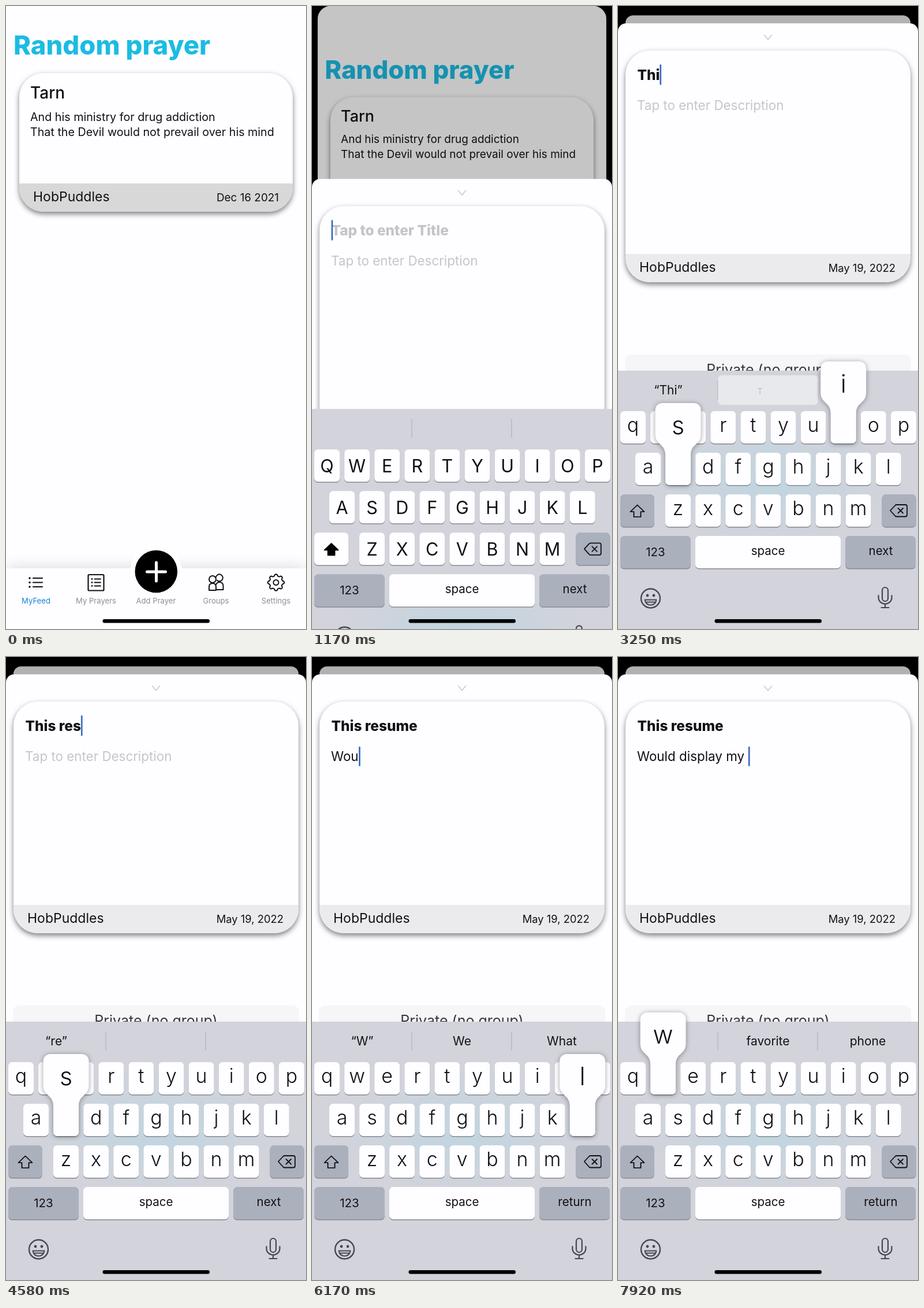
These frames come from a looping animation (520x1078 px, 8000 ms). An HTML page with a canvas:

```html
<!DOCTYPE html>
<html lang="en">
<head>
<meta charset="utf-8">
<title>Adding a prayer</title>
<style>
  html, body { margin: 0; width: 100%; height: 100%; overflow: hidden; background: #000; }
  canvas { display: block; width: 520px; height: 1078px; }
</style>
</head>
<body>
<canvas id="stage" width="520" height="1078"></canvas>
<script>
const ctx = document.getElementById('stage').getContext('2d');
const W = 520, H = 1078, LOOP = 8000, STEP = 1000 / 12;
const PAPER = '#fefdff', INK = '#111114', KEY_GRAY = '#abb0bd';
const USER = 'HobPuddles';

// Timeline (ms)
const OPEN = 1012, FOCUS_BODY = 5480, NEXT_TAP = 5390;
const TYPE_DELAY = 90, POPUP_TIME = 190, SPACE_TIME = 100;
const strokes = (text, times) => [...text].map((char, i) => ({ char, at: times[i] }));
const titleKeys = strokes('This resume',
  [2240, 2720, 3090, 3210, 3560, 3900, 4200, 4470, 4720, 4960, 5180]);
const bodyKeys = strokes('Would display my w',
  [5690, 5830, 5950, 6130, 6290, 6440, 6560, 6660, 6760, 6850, 6940, 7050, 7270, 7400, 7510, 7630, 7760, 7915]);
const allKeys = [...titleKeys, ...bodyKeys];
const suggestions = [
  [0], [2400, '“T”', 'The', 'This'], [2850, '“Th”', 'The', 'This'], [3200, '“Thi”'],
  [3400, '“This”'], [3650, 'is', 'one', 'morning'], [4010, '“r”', 'is', 'right'],
  [4320, '“re”'], [4810, '“resu”', 'result', 'results'], [5270, '“resume”', 'resumes', 'resumed'],
  [5490, 'I', 'The', 'I’m'], [5800, '“W”', 'We', 'What'], [6250, '“Would”', 'Would', 'Wouldn’t'],
  [6530, 'you', 'be', 'like'], [6750, '“dis”', 'did', 'discuss'], [6950, '“disp”', 'display', 'displayed'],
  [7480, 'the', 'a', 'my'], [7600, '“m”', 'my', 'me'], [7850, 'life', 'favorite', 'phone'],
];

const typed = (keys, t) => keys.filter(k => t >= k.at + TYPE_DELAY).map(k => k.char).join('');
const spring = (t, speed) => {
  const u = Math.max(0, t - OPEN) / 1000 * speed;
  return 1 - (1 + u) * Math.exp(-u);
};

// Drawing helpers
function text(str, x, y, size, { color = INK, weight = 400, align = 'left' } = {}) {
  ctx.font = `${weight} ${size}px Inter, sans-serif`;
  ctx.fillStyle = color;
  ctx.textAlign = align;
  ctx.fillText(str, x, y);
}
function box(x, y, w, h, radius, color) {
  ctx.beginPath();
  ctx.roundRect(x, y, w, h, radius);
  ctx.fillStyle = color;
  ctx.fill();
}
function shadowed(color, blur, dy, draw) {
  ctx.save();
  ctx.shadowColor = color;
  ctx.shadowBlur = blur;
  ctx.shadowOffsetY = dy;
  draw();
  ctx.restore();
}
function stroke(path, color = INK, width = 2) {
  ctx.strokeStyle = color;
  ctx.lineWidth = width;
  ctx.lineCap = ctx.lineJoin = 'round';
  ctx.stroke(new Path2D(path));
}
function disc(x, y, r, color) {
  ctx.beginPath();
  ctx.arc(x, y, r, 0, 7);
  ctx.fillStyle = color;
  ctx.fill();
}
function card(x, y, w, h, footerColor) {
  shadowed('rgba(0,0,0,.5)', 10, 4, () => box(x, y, w, h, 42, PAPER));
  ctx.save();
  ctx.beginPath();
  ctx.roundRect(x, y, w, h, 42);
  ctx.clip();
  ctx.fillStyle = footerColor;
  ctx.fillRect(x, y + h - 49, w, 49);
  ctx.restore();
  text(USER, x + 24, y + h - 18, 23);
}

function drawTabBar() {
  shadowed('rgba(0,0,0,.12)', 22, -4, () => box(0, 973, W, 110, 0, PAPER));
  disc(260, 978.5, 45, PAPER);
  disc(260.3, 978.5, 36.8, '#000');
  stroke('M244.500 979H276.500M260.500 963V995', '#fff', 5);

  for (const y of [990, 997.5, 1005]) {
    disc(41, y, 1.8, INK);
    stroke(`M47 ${y}H63`, INK, 2.2);
  }
  stroke('M144 984H168Q169.500 984 169.500 985.500V1010Q169.500 1011.500 168 1011.500H144Q142.500 1011.500 142.500 1010V985.500Q142.500 984 144 984Z', INK, 2.2);
  for (const y of [991.5, 997.5, 1003.5]) {
    disc(149, y, 1.4, INK);
    stroke(`M153.500 ${y}H164`, INK, 2);
  }
  stroke('M352 1011V1005Q352 999 358 999Q364 999 364 1005V1011ZM364 1010H376.500V1003Q376 997 370 997Q366 997 364 1001');
  stroke('M352 992a6 6 0 1 0 12 0a6 6 0 1 0 -12 0M364 988a6 6 0 1 1 2 6');

  let gear = '';
  for (let i = 0; i <= 96; i++) {
    const a = i / 96 * 2 * Math.PI, r = 12.7 + 1.5 * Math.tanh(2 * Math.cos(8 * a));
    gear += `${i ? 'L' : 'M'}${468 + r * Math.cos(a)} ${997.5 + r * Math.sin(a)}`;
  }
  stroke(gear);
  stroke('M463.500 997.500a4.500 4.500 0 1 0 9 0a4.500 4.500 0 1 0 -9 0');

  ['MyFeed', 'My Prayers', 'Add Prayer', 'Groups', 'Settings'].forEach((label, i) =>
    text(label, 52 + i * 104, 1034, 13.1, { color: i ? '#8e8e93' : '#1584d8', align: 'center' }));
}

function drawFeed(p) {
  const scale = 1 - .05 * p;
  ctx.save();
  // The screen's own centre lies above the stage centre.
  ctx.translate(260, 515 + 36 * p);
  ctx.scale(scale, scale);
  ctx.translate(-260, -515);
  ctx.beginPath();
  ctx.roundRect(0, -48, W, 1126, p > 0 ? 54 - 40 * p : 0);
  ctx.clip();
  ctx.fillStyle = PAPER;
  ctx.fillRect(0, -48, W, 1126);
  text('Random prayer', 13, 83.5, 45.4, { color: '#1bbce3', weight: 800 });
  card(23, 116, 474, 240, '#d8d8d9');
  text('Tarn', 42, 160, 28, { weight: 500 });
  text('And his ministry for drug addiction', 42, 199, 19.7);
  text('That the Devil would not prevail over his mind', 42, 225, 19.7);
  text('Dec 16 2021', 473, 338, 18.9, { align: 'right' });
  drawTabBar();
  ctx.fillStyle = `rgba(0,0,0,${.3 * p})`;
  ctx.fillRect(0, -48, W, 1126);
  ctx.restore();
}

function cursorAlpha(t) {
  if (t >= 2240) return 1;
  return Math.min(1, Math.max(0, (1960 - t) / 160));
}

function drawSheet(t, y) {
  const title = typed(titleKeys, t), body = typed(bodyKeys, t);
  ctx.save();
  ctx.translate(0, y - 30);
  box(0, 30, W, 1100, [14, 14, 0, 0], PAPER);
  stroke('M253.500 50L260 58L266.500 50', '#c9c8cb', 1.5);
  card(13, 77, 494, 401, '#ebeaec');
  text('May 19, 2022', 481, 460, 18.4, { align: 'right' });

  const onBody = t >= FOCUS_BODY;
  text(body || 'Tap to enter Description', 33, 180, 22.4, { color: body ? INK : '#c6c5ca' });
  let caret = ctx.measureText(body).width;
  text(title || 'Tap to enter Title', 33.5, 127.5, 24.4, { color: title ? INK : '#c4c3c8', weight: 800 });
  if (!onBody) caret = ctx.measureText(title).width;
  ctx.globalAlpha = cursorAlpha(t);
  box(33.5 + caret, onBody ? 155 : 101, 2.7, onBody ? 34 : 35.5, 1.3, '#3a6cc0');
  ctx.globalAlpha = 1;

  box(12, 603, 496, 60, 10, '#f6f5f7');
  text('Private (no group)', 260, 638, 25, { color: '#38373b', align: 'center' });
  ctx.restore();
}

// Keyboard, in its resting position
const rows = ['qwertyuiop', 'asdfghjkl', 'zxcvbnm'];
const rowLeft = [4, 30, 82];
const keyAt = {};
rows.forEach((row, r) => [...row].forEach((char, i) => {
  keyAt[char] = { x: rowLeft[r] + i * 52.1, y: 701 + r * 72 };
}));

function key(x, y, w, color) {
  box(x, y + 1.5, w, 56, 6.5, '#898a90');
  box(x, y, w, 56, 6.5, color);
}

function drawPopup(char) {
  const { x, y } = keyAt[char.toLowerCase()];
  const top = y - 86, bottom = y + 56, right = x + 44;
  const l = Math.min(Math.max(x - 17.5, 3), 438), r = l + 79;
  shadowed('rgba(0,0,0,.38)', 8, 1, () => {
    ctx.beginPath();
    ctx.moveTo(l + 12, top);
    ctx.arcTo(r, top, r, top + 12, 12);
    ctx.lineTo(r, top + 54);
    ctx.bezierCurveTo(r, top + 73, right, top + 70, right, top + 90);
    ctx.arcTo(right, bottom, x, bottom, 6.5);
    ctx.arcTo(x, bottom, x, top + 90, 6.5);
    ctx.lineTo(x, top + 90);
    ctx.bezierCurveTo(x, top + 70, l, top + 73, l, top + 54);
    ctx.arcTo(l, top, l + 12, top, 12);
    ctx.fillStyle = PAPER;
    ctx.fill();
  });
  text(char, l + 39.5, top + 54, 43, { weight: 300, align: 'center' });
}

function drawSuggestions(t) {
  for (const x of [173, 346]) box(x - .8, 648, 1.5, 33, 0, '#b8bac3');
  if (t > 3200 && t < 3400) {
    box(173.5, 639, 173, 51, 6, '#e8e9ed');
    text('T', 246, 672, 15, { color: '#bfc0c5', align: 'center' });
  }
  const words = suggestions.filter(s => t >= s[0]).pop().slice(1);
  words.forEach((word, i) => text(word, 87 + i * 173, 672, 21, { align: 'center' }));
}

function drawKeyboard(t, top, sheetY) {
  ctx.save();
  ctx.translate(0, top - 631);
  box(0, 631, W, 500, 0, '#d2d3db');

  // Blurred button showing through
  ctx.save();
  ctx.translate(260, 820 + (sheetY - 30) - (top - 631));
  ctx.scale(2, 1);
  const tint = ctx.createRadialGradient(0, 0, 10, 0, 0, 105);
  tint.addColorStop(0, 'rgba(193,213,224,1)');
  tint.addColorStop(1, 'rgba(193,213,224,0)');
  ctx.beginPath();
  ctx.arc(0, 0, 105, 0, 7);
  ctx.fillStyle = tint;
  ctx.fill();
  ctx.restore();

  drawSuggestions(t);
  const upper = !typed(t < FOCUS_BODY ? titleKeys : bodyKeys, t);
  const down = allKeys.filter(k => t >= k.at && t < k.at + (k.char === ' ' ? SPACE_TIME : POPUP_TIME));
  for (const [char, { x, y }] of Object.entries(keyAt)) {
    key(x, y, 44, PAPER);
    if (upper) text(char.toUpperCase(), x + 22, y + 40, 30.5, { align: 'center' });
    else text(char, x + 22, y + 35.5, 34, { weight: 300, align: 'center' });
  }

  key(4, 845, 59, upper ? PAPER : KEY_GRAY);
  const arrow = 'M33.500 863.500L45.500 875H39.500V884H27.500V875H21.500Z';
  stroke(arrow, '#000', 1.7);
  if (upper) {
    ctx.fillStyle = '#000';
    ctx.fill(new Path2D(arrow));
  }
  key(457.5, 845, 59, KEY_GRAY);
  stroke('M472 873L480.500 864Q481.500 863 483 863H498Q501 863 501 866V880.500Q501 883.500 498 883.500H483Q481.500 883.500 480.500 882.500ZM485.500 869L494 877.500M494 869L485.500 877.500', INK, 1.8);

  const nextDown = t >= NEXT_TAP && t < FOCUS_BODY;
  key(4, 917, 122, KEY_GRAY);
  key(134, 917, 252, down.some(k => k.char === ' ') ? KEY_GRAY : PAPER);
  key(394, 917, 122, nextDown ? PAPER : KEY_GRAY);
  text('123', 65, 952, 20.5, { align: 'center' });
  text('space', 260, 950, 20.5, { align: 'center' });
  text(t < FOCUS_BODY ? 'next' : 'return', 455.5, 950, 20.5, { align: 'center' });

  const icon = '#454850';
  stroke('M40 1025a16.500 16.500 0 1 0 33 0a16.500 16.500 0 1 0 -33 0', icon, 2.4);
  disc(51, 1020, 2.4, icon);
  disc(62, 1020, 2.4, icon);
  stroke('M46.500 1027.500H66.500Q65 1036.500 56.500 1036.500Q48 1036.500 46.500 1027.500ZM49 1031.500H64', icon, 2);
  stroke('M458 1011a5 5 0 0 1 10 0V1025a5 5 0 0 1 -10 0ZM451.500 1020V1024a11.500 10.500 0 0 0 23 0V1020M463 1034.500V1041M456.500 1041H469.500', icon, 2.2);

  down.filter(k => k.char !== ' ').forEach(k => drawPopup(k.char));
  ctx.restore();
}

function frame() {
  const t = Math.floor((performance.now() % LOOP + 4) / STEP) * STEP % LOOP;
  const p = spring(t, 17.17);
  const sheetY = H - 1048 * p;
  ctx.fillStyle = '#000';
  ctx.fillRect(0, 0, W, H);
  drawFeed(p);
  if (p > 0) {
    drawSheet(t, sheetY);
    drawKeyboard(t, H - 447 * spring(t, 21.9), sheetY);
  }
  box(167.5, 1061, 185.5, 6.5, 3.25, '#000');
  requestAnimationFrame(frame);
}
frame();
</script>
</body>
</html>
```
